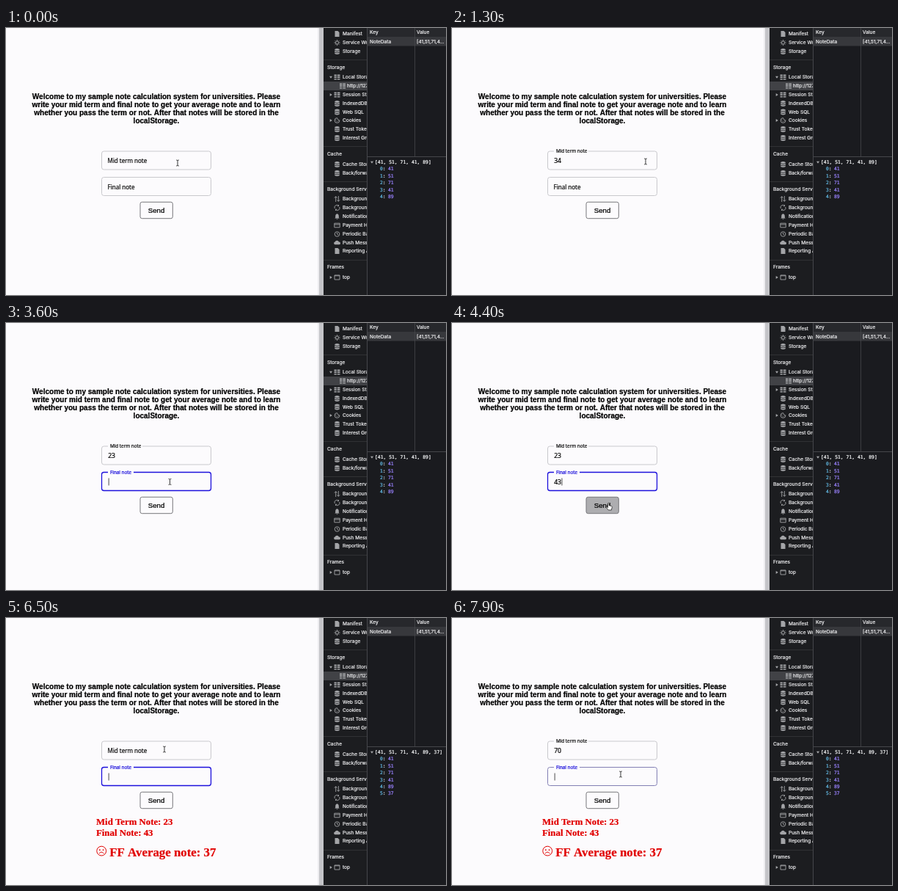
An HTML page with a canvas for the animation above (8 s loop, 600 by 364 pixels).

```html
<!DOCTYPE html>
<html lang="en">
<head>
<meta charset="utf-8">
<title>Note calculation</title>
<style>
html, body { margin: 0; width: 600px; height: 364px; overflow: hidden; background: #fcfbfd; }
canvas { display: block; }
</style>
</head>
<body>
<canvas id="stage" width="600" height="364"></canvas>
<script>
const ctx = document.getElementById('stage').getContext('2d');
const LOOP = 8000, FRAME = 100;
const SANS = '"Liberation Sans", sans-serif';
const FORM = '"Noto Sans", sans-serif';
const SERIF = '"Liberation Serif", serif';
const MONO = '6.38px "DejaVu Sans Mono", monospace';
const PANEL = '6.6px Inter, sans-serif';
const PAGE = '#fcfbfd', BLUE = '#1c10dc', GREY = '#c9c9cd', PALE = '#ececee', ICON = '#a4a5a8', RULE = '#45464a';

// Timelines: [ms, value]
const focus = [[0, ''], [250, 'mid'], [750, ''], [1450, 'mid'], [3350, 'final'], [5750, 'mid'],
  [6150, 'final'], [6650, 'mid'], [7750, 'final']];
const fields = [
  { id: 'mid', label: 'Mid term note', y: 168, notch: 47,
    value: [[0, ''], [450, '3'], [550, '34'], [2050, ''], [2600, '2'], [2750, '23'], [5950, ''], [7000, '7'], [7150, '70']],
    raised: [[-1000, 0], [250, 1], [6150, 0], [6650, 1]] },
  { id: 'final', label: 'Final note', y: 203.5, notch: 35,
    value: [[0, ''], [3850, '4'], [3950, '43'], [6350, '']],
    raised: [[-1000, 0], [3350, 1]] }
];
const pointerPath = [[0, 234, 184], [300, 234, 184], [700, 262, 262], [1000, 266, 196], [1300, 264, 182],
  [1800, 274, 184], [2000, 334, 200], [2200, 232, 184], [2900, 232, 184], [3300, 225, 216], [3900, 222, 217],
  [4300, 214, 250], [4600, 214, 250], [5400, 194, 188], [5800, 202, 184], [6150, 212, 215], [6500, 216, 179],
  [7200, 216, 181], [7700, 230, 213], [LOOP, 230, 213]];
const SENT = 4650;

const last = (keys, t) => keys.filter(k => k[0] <= t).pop();
const mix = (a, b, p) => a + (b - a) * p;

function pointerAt(t) {
  const i = pointerPath.findIndex(k => k[0] > t);
  const a = pointerPath[i - 1], b = pointerPath[i];
  let p = (t - a[0]) / (b[0] - a[0]);
  p = p * p * (3 - 2 * p);
  return [mix(a[1], b[1], p), mix(a[2], b[2], p)];
}

// A hairline stroke gives the glyphs a slightly heavier weight.
function text(str, x, y, font, color, align = 'left') {
  ctx.font = font;
  ctx.fillStyle = ctx.strokeStyle = color;
  ctx.textAlign = align;
  ctx.lineWidth = .22;
  ctx.fillText(str, x, y);
  ctx.strokeText(str, x, y);
}

function rect(x, y, w, h, color) {
  ctx.fillStyle = color;
  ctx.fillRect(x, y, w, h);
}

function box(x, y, w, h, r, stroke, width, fill) {
  ctx.beginPath();
  ctx.roundRect(x, y, w, h, r);
  if (fill) { ctx.fillStyle = fill; ctx.fill(); }
  ctx.strokeStyle = stroke;
  ctx.lineWidth = width;
  ctx.stroke();
}

function path(d, x, y, stroke, width = 1, fill) {
  const p = new Path2D(d);
  ctx.save();
  ctx.translate(x, y);
  if (fill) { ctx.fillStyle = fill; ctx.fill(p); }
  if (stroke) { ctx.strokeStyle = stroke; ctx.lineWidth = width; ctx.stroke(p); }
  ctx.restore();
}

// Sidebar icons, centred on 0,0: [path, filled]
const icons = {
  file: ['M-3-4H1L3-2V4H-3Z', true],
  gear: ['M-2 0a2 2 0 1 0 4 0a2 2 0 1 0-4 0M0-4V-2M0 4V2M-4 0H-2M4 0H2M-2.8-2.8L-1.5-1.5M2.8 2.8L1.5 1.5M-2.8 2.8L-1.5 1.5M2.8-2.8L1.5-1.5'],
  disk: ['M-3.3-3Q0-5 3.3-3V-1.8Q0-.4-3.3-1.8ZM-3.3-1Q0 .4 3.3-1V.8Q0 2.2-3.3 .8ZM-3.3 1.6Q0 3 3.3 1.6V3Q0 5-3.3 3Z', true],
  table: ['M-4-3.5H-.7V-1.6H-4ZM.2-3.5H4V-1.6H.2ZM-4-.8H-.7V1.1H-4ZM.2-.8H4V1.1H.2ZM-4 1.9H-.7V3.6H-4ZM.2 1.9H4V3.6H.2Z', true],
  cookie: ['M3.4 0A3.4 3.4 0 1 1 0-3.4Q.4-.6 3.4 0M-1.6-1V0M-.8 1.6H.2M1.2 .8H2'],
  arrows: ['M-1.8 4V-3M-3.6-1.4L-1.8-3.4L0-1.4M1.8-4V3M0 1.4L1.8 3.4L3.6 1.4'],
  sync: ['M-3.2 1A3.2 3.2 0 0 1 2-2.6M3.2-1A3.2 3.2 0 0 1-2 2.6M2-4V-2.2H.3M-2 4V2.2H-.3'],
  bell: ['M-3.2 2.6L-2.3 1.4V-1Q-2-3.6 0-3.8Q2-3.6 2.3-1V1.4L3.2 2.6ZM-1 3.2H1L0 4.2Z', true],
  card: ['M-3.7-2.8H3.7V2.8H-3.7ZM-3.7-1H3.7'],
  clock: ['M-3.3 0a3.3 3.3 0 1 0 6.6 0a3.3 3.3 0 1 0-6.6 0M0-2V0L1.5 1'],
  cloud: ['M-3 2.8A1.9 1.9 0 0 1-2.8-.9A2.8 2.8 0 0 1 2.4-1A1.9 1.9 0 0 1 2.8 2.8Z', true],
  frame: ['M-3.5-3H3.5V3H-3.5ZM-3.5-2.2H3.5']
};

// [centre y, icon, label, tree arrow]
const rows = [
  [8, 'file', 'Manifest'], [20, 'gear', 'Service Workers'], [32, 'disk', 'Storage'],
  [67, 'table', 'Local Storage', 'open'], [91, 'table', 'Session Storage', 'shut'],
  [103, 'disk', 'IndexedDB'], [114.5, 'disk', 'Web SQL'], [126, 'cookie', 'Cookies', 'shut'],
  [138, 'disk', 'Trust Tokens'], [150, 'disk', 'Interest Groups'],
  [186, 'disk', 'Cache Storage'], [198, 'disk', 'Back/forward cache'],
  [233, 'arrows', 'Background Fetch'], [245, 'sync', 'Background Sync'], [257, 'bell', 'Notifications'],
  [269, 'card', 'Payment Handler'], [281, 'clock', 'Periodic Background'], [292.5, 'cloud', 'Push Messaging'],
  [304, 'file', 'Reporting API'], [340, 'frame', 'top', 'shut']
];
const headings = [[54, 'Storage'], [172, 'Cache'], [220, 'Background Services'], [326, 'Frames']];

function icon(name, x, y) {
  const [d, filled] = icons[name];
  path(d, x, y, filled ? null : ICON, .9, filled ? ICON : null);
}

function treeArrow(kind, x, y) {
  path(kind === 'open' ? 'M-2-1.3H2L0 1.8Z' : 'M-1.3-2V2L1.8 0Z', x, y, null, 1, ICON);
}

function sidebar() {
  rect(425, 0, 2, 364, '#eeedf0');
  rect(427, 0, 6, 364, '#c4c4c8');
  rect(433, 0, 59, 364, '#1c1d20');
  ctx.save();
  ctx.beginPath();
  ctx.rect(433, 0, 59, 364);
  ctx.clip();
  for (const y of [43, 161, 209, 316]) rect(433, y, 59, .8, '#36373a');
  rect(433, 73, 59, 12, '#414246');
  for (const [y, label] of headings) text(label, 438, y + 2.4, PANEL, PALE);
  for (const [y, name, label, arrow] of rows) {
    if (arrow) treeArrow(arrow, 443, y);
    icon(name, 451.5, y);
    text(label, 459, y + 2.4, PANEL, PALE);
  }
  icon('table', 459, 79);
  text('http://127.0.0.1', 465, 81.4, PANEL, PALE);
  ctx.restore();
}

function storagePanel(t) {
  const notes = [41, 51, 71, 41, 89];
  if (t >= SENT) notes.push(37);
  rect(492, 0, 108, 364, '#1a1b1f');
  rect(492, 0, 1, 364, RULE);
  rect(493, 0, 107, 12, '#27282c');
  rect(493, 12, 107, 12.5, '#37383c');
  rect(557, 0, .8, 175, RULE);
  rect(493, 175, 107, 1, RULE);
  text('Key', 496, 8.4, PANEL, PALE);
  text('Value', 560, 8.4, PANEL, PALE);
  text('NoteData', 496, 20.9, PANEL, PALE);
  text('[41,51,71,4…', 560, 20.9, PANEL, PALE);
  treeArrow('open', 499, 183);
  text('[' + notes.join(', ') + ']', 503, 185.3, MONO, '#f6f7f8');
  notes.forEach((n, i) => {
    const y = 194.4 + i * 9.4;
    text(i, 510, y, MONO, '#62b8e2');
    text(':', 513.8, y, MONO, PALE);
    text(n, 521, y, MONO, '#9a82ff');
  });
}

function drawField(f, t) {
  const [since, owner] = last(focus, t);
  const active = owner === f.id, fresh = t - since < 200;
  const [start, target] = last(f.raised, t);
  const p = 1 - (1 - Math.min((t - start) / 200, 1)) ** 3;
  const up = target ? p : 1 - p;
  const value = last(f.value, t)[1];
  const border = active ? (fresh ? '#827fb4' : BLUE) : GREY;
  box(130.5, f.y, 149, 25, 3, border, active && !fresh ? 1.3 : 1);
  if (up > 0) rect(139, f.y - 1.5, f.notch * up, 3, PAGE);
  text(f.label, mix(138.5, 142, up), f.y + mix(16, 2.3, up),
    mix(8, 6.3, up) + 'px ' + FORM, active ? BLUE : '#111');
  text(value, 139.2, f.y + 16.2, '8.6px ' + FORM, '#000');
  if (active) rect(139.7 + ctx.measureText(value).width, f.y + 8, .8, 10, '#222');
}

function results() {
  const red = '#e10000', bold = 'bold 12.8px ' + SERIF;
  text('Mid Term Note: 23', 123, 281.5, bold, red);
  text('Final Note: 43', 123, 296.5, bold, red);
  text('FF Average note: 37', 141.3, 325, 'bold 16.85px ' + SERIF, red);
  path('M-6.4 0a6.4 6.4 0 1 0 12.8 0a6.4 6.4 0 1 0-12.8 0M-3.2 3.6Q0-.6 3.2 3.6', 130.2, 317.6, red, 1);
  path('M-3.2-2.2h1.7v1.7h-1.7ZM1.5-2.2h1.7v1.7h-1.7Z', 130.2, 317.6, null, 1, red);
}

function drawPointer(x, y, overButton) {
  if (overButton) {
    path('M-1.5 0V-4.2Q-.7-5.2 .1-4.2V-1.2L3.6-.4Q4.5 0 4.2 1.5L3.4 5H-.8L-3.6 1.6Q-3.5 .4-2.5 .8L-1.5 1.8Z',
      x, y, '#222', .8, '#fff');
  } else if (x > 130 && x < 280 && y > 167 && y < 229) {
    path('M-1.8-4Q0-4 0-3Q0-4 1.8-4M0-3V3M-1.8 4Q0 4 0 3Q0 4 1.8 4', x, y, '#222', .9);
  } else {
    path('M0 0V8.5L2 6.6L3.4 9.6L4.8 9L3.4 6H6Z', x, y, '#fff', .7, '#111');
  }
}

function draw(t) {
  rect(0, 0, 600, 364, PAGE);
  ['Welcome to my sample note calculation system for universities. Please',
    'write your mid term and final note to get your average note and to learn',
    'whether you pass the term or not. After that notes will be stored in the',
    'localStorage.'
  ].forEach((line, i) => text(line, 205, 96.6 + i * 11.2, 'bold 10px ' + SANS, '#000', 'center'));
  for (const f of fields) drawField(f, t);
  const [x, y] = pointerAt(t);
  const overButton = x > 183 && x < 227 && y > 237 && y < 260;
  box(183, 237.3, 44.3, 22.4, 2.5, '#77777b', 1, overButton ? '#adadb0' : PAGE);
  text('Send', 205, 251.7, '9.7px ' + SANS, '#000', 'center');
  if (t >= SENT) results();
  sidebar();
  storagePanel(t);
  drawPointer(x, y, overButton);
}

function tick() {
  draw(Math.floor(performance.now() % LOOP / FRAME) * FRAME);
  requestAnimationFrame(tick);
}
tick();
</script>
</body>
</html>
```
